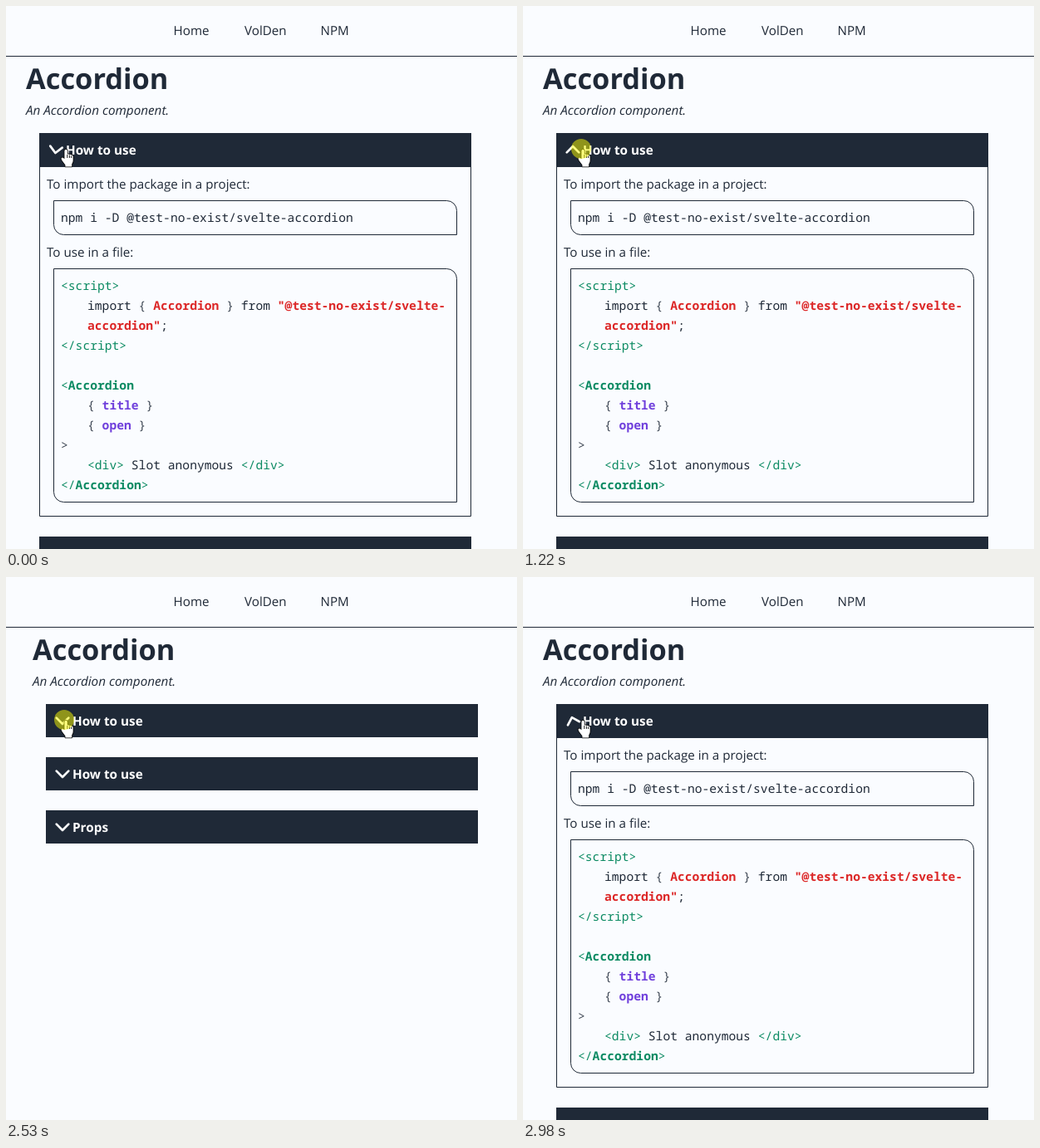
Write an HTML page with a canvas that moves like this. It is 615 by 654 pixels and loops after 3.02 s.

```html
<!DOCTYPE html>
<html lang="en">
<head>
<meta charset="utf-8">
<title>Accordion</title>
<style>
  html, body { margin: 0; width: 100%; height: 100%; overflow: hidden; background: #fafcff; }
  canvas { display: block; }
</style>
</head>
<body>
<canvas id="stage" width="615" height="654"></canvas>
<script>
const ctx = document.getElementById('stage').getContext('2d');

const LOOP = 3020, STEP = 40, TURN = 400;
const CLOSE_AT = 1430, OPEN_AT = 2740, CLICK_TIME = 210;

const PAPER = '#fafcff', INK = '#1f2937', GREEN = '#0b8a62', RED = '#dc2626', VIOLET = '#7040dc', GREY = '#3f4855';
const SANS = '"Open Sans", "Noto Sans", sans-serif';
const MONO = '"Noto Sans Mono", "DejaVu Sans Mono", monospace';
const BODY = '15.2px ' + SANS;
const BOLD = 'bold 15.3px ' + SANS;
const CODE = '14.667px ' + MONO;
const CHAR = 8.8;

// Each run: text, colour, bold flag
const codeLines = [
  [0, ['<script>', GREEN]],
  [1, ['import ', INK], ['{ ', GREY], ['Accordion', RED, 1], [' } ', GREY], ['from ', INK], ['"@test-no-exist/svelte-', RED, 1]],
  [1, ['accordion"', RED, 1], [';', INK]],
  [0, ['<\/script>', GREEN]],
  [0],
  [0, ['<', GREEN], ['Accordion', GREEN, 1]],
  [1, ['{ ', GREY], ['title', VIOLET, 1], [' }', GREY]],
  [1, ['{ ', GREY], ['open', VIOLET, 1], [' }', GREY]],
  [0, ['>', GREY]],
  [1, ['<div>', GREEN], [' Slot anonymous ', INK], ['</div>', GREEN]],
  [0, ['</', GREEN], ['Accordion', GREEN, 1], ['>', GREEN]]
];

const hand = new Path2D('M70.4 174.4a1.7 1.7 0 0 1 3.4 0V178.6q1.5-.8 2.6.4q1.4-.7 2.3.6q1.9-.5 2 1.8V186q0 2.5-1.5 4.5V193.5H71.4V191.5L67 185.4q-1.3-2 .5-2.8q1.4-.2 2.9 1.6Z');
const knuckles = new Path2D('M73.8 179V183M76.4 179.6V183M78.7 180.4V183');

function text(str, x, y, font, color = INK) {
  ctx.font = font;
  ctx.fillStyle = color;
  ctx.fillText(str, x, y);
}

function rect(x, y, w, h, color = INK) {
  ctx.fillStyle = color;
  ctx.fillRect(x, y, w, h);
}

function outline(x, y, w, h, radii) {
  ctx.strokeStyle = INK;
  ctx.lineWidth = 1;
  ctx.beginPath();
  ctx.roundRect(x + 0.5, y + 0.5, w - 1, h - 1, radii);
  ctx.stroke();
}

// Cubic curve .25 .1 .25 1, solved by bisection
function ease(x) {
  if (x <= 0) return 0;
  if (x >= 1) return 1;
  const curve = (u, a, b) => 3 * (1 - u) * (1 - u) * u * a + 3 * (1 - u) * u * u * b + u * u * u;
  let lo = 0, hi = 1;
  for (let i = 0; i < 24; i++) {
    const mid = (lo + hi) / 2;
    if (curve(mid, 0.25, 0.25) < x) lo = mid; else hi = mid;
  }
  return curve(lo, 0.1, 1);
}

// Turn progress advances in steps of 40 ms
function turned(since, lead) {
  return ease((Math.floor(since / STEP) * STEP + lead) / TURN);
}

function chevronAngle(t) {
  if (t < CLOSE_AT) return Math.PI * turned(t, 25);
  if (t < OPEN_AT) return Math.PI * (1 - turned(t - CLOSE_AT, 15));
  return Math.PI * turned(t - OPEN_AT, 15);
}

function chevron(x, y, angle) {
  ctx.save();
  ctx.translate(x, y);
  ctx.rotate(angle);
  ctx.strokeStyle = '#fff';
  ctx.lineWidth = 2.7;
  ctx.lineCap = 'round';
  ctx.lineJoin = 'round';
  ctx.beginPath();
  ctx.moveTo(-7.3, -3.4);
  ctx.lineTo(0, 4);
  ctx.lineTo(7.3, -3.4);
  ctx.stroke();
  ctx.restore();
}

function bar(x, y, h, title, angle) {
  rect(x, y, 520, h);
  chevron(x + 20, y + 20, angle);
  text(title, x + 32, y + 26, BOLD, '#fff');
}

function codeRow(runs, x, y) {
  for (const [str, color, bold] of runs) {
    text(str, x, y, (bold ? 'bold ' : '') + CODE, color);
    x += str.length * CHAR;
  }
}

function page(x) {
  rect(0, 0, 615, 654, PAPER);
  text('Home', 201.5, 35, BODY);
  text('VolDen', 287, 35, BODY);
  text('NPM', 378.5, 35, BODY);
  rect(0, 60, 615, 1);
  text('Accordion', x, 100, 'bold 34.4px ' + SANS);
  text('An Accordion component.', x, 131, 'italic 15.3px ' + SANS);
}

function openPanel(angle) {
  outline(40, 153, 520, 462, 0);
  bar(40, 153, 41, 'How to use', angle);
  text('To import the package in a project:', 49, 220, BODY);
  outline(57, 234, 486, 42, [0, 12, 0, 12]);
  codeRow([['npm i -D @test-no-exist/svelte-accordion', INK]], 66, 260);
  text('To use in a file:', 49, 302, BODY);
  outline(57, 316, 486, 282, [0, 12, 0, 12]);
  codeLines.forEach(([indent, ...runs], i) => codeRow(runs, 66 + indent * 32, 342 + i * 24));
  rect(40, 639, 520, 15);
}

function closedPanels(angle) {
  bar(48, 153, 40, 'How to use', angle);
  bar(48, 217, 40, 'How to use', 0);
  bar(48, 281, 40, 'Props', 0);
}

function cursor() {
  ctx.lineJoin = 'round';
  ctx.lineCap = 'butt';
  ctx.strokeStyle = '#000';
  ctx.lineWidth = 1.6;
  ctx.stroke(hand);
  ctx.fillStyle = '#fff';
  ctx.fill(hand);
  ctx.lineWidth = 0.9;
  ctx.stroke(knuckles);
}

function clickMark() {
  ctx.fillStyle = 'rgba(255, 255, 0, 0.5)';
  ctx.beginPath();
  ctx.arc(70, 172, 12, 0, Math.PI * 2);
  ctx.fill();
}

function draw(t) {
  const closed = t >= CLOSE_AT && t < OPEN_AT;
  const angle = chevronAngle(t);
  page(closed ? 32 : 24);
  if (closed) closedPanels(angle); else openPanel(angle);
  cursor();
  if ([CLOSE_AT, OPEN_AT].some(end => t >= end - CLICK_TIME && t < end)) clickMark();
}

ctx.textRendering = 'geometricPrecision';
const start = performance.now();
function tick() {
  draw((performance.now() - start) % LOOP);
  requestAnimationFrame(tick);
}
tick();
</script>
</body>
</html>
```
